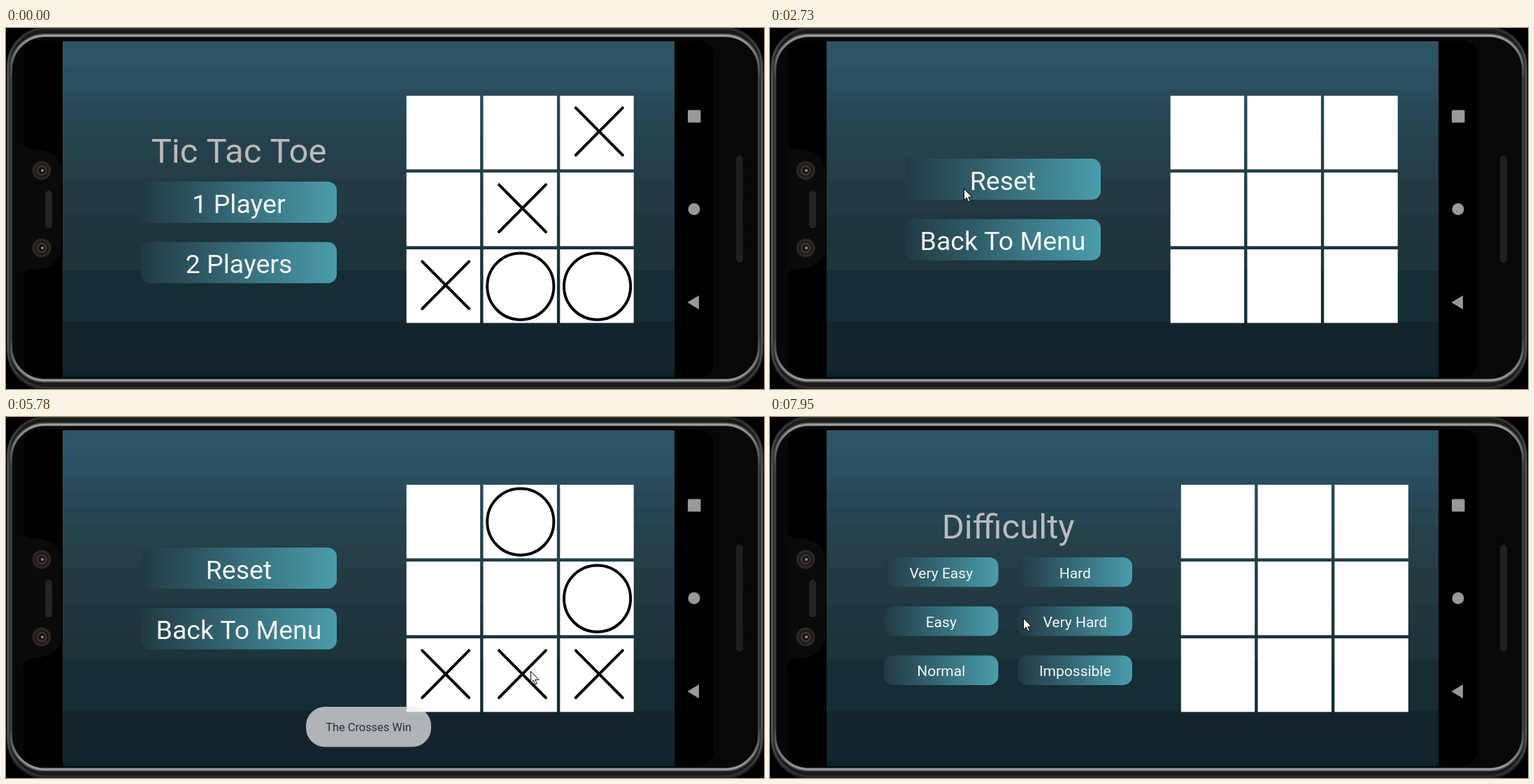
These frames come from a looping animation (1084x517 px, 8000 ms). An HTML page with a canvas:

```html
<!DOCTYPE html>
<html lang="en">
<head>
<meta charset="utf-8">
<title>Tic Tac Toe</title>
<style>
html, body { margin: 0; width: 100%; height: 100%; overflow: hidden; background: #000; }
canvas { display: block; }
</style>
</head>
<body>
<canvas id="stage" width="1084" height="517"></canvas>
<script>
const W = 1084, H = 517, LOOP = 8000, STEP = 70;
const FONT = 'Roboto, "Open Sans", sans-serif';
const stage = document.getElementById('stage').getContext('2d');

const makeLayer = () => {
  const c = document.createElement('canvas');
  c.width = W;
  c.height = H;
  return c;
};

function roundRect(g, x, y, w, h, r) {
  g.beginPath();
  g.roundRect(x, y, w, h, r);
}

function disc(g, x, y, r, color) {
  g.fillStyle = color;
  g.beginPath();
  g.arc(x, y, r, 0, Math.PI * 2);
  g.fill();
}

function label(g, text, x, baseline, size, color) {
  g.font = `${size}px ${FONT}`;
  g.textAlign = 'center';
  g.fillStyle = color;
  g.fillText(text, x, baseline);
}

// ---- phone body ----

function speaker(g, x, y, w, h, color) {
  g.save();
  roundRect(g, x, y, w, h, w / 2);
  g.fillStyle = '#141414';
  g.fill();
  g.clip();
  g.fillStyle = color;
  for (let j = 0; j < h; j += 2)
    for (let i = (j / 2) % 2; i < w; i += 2) g.fillRect(x + i, y + j, 1, 1);
  g.restore();
}

function lens(g, x, y) {
  disc(g, x, y, 13.5, '#2b2721');
  disc(g, x, y, 10, '#1c1915');
  disc(g, x, y, 7.5, '#3a3732');
  disc(g, x, y, 5, '#161616');
  disc(g, x + 1, y, 2, '#8a8a86');
}

// A rounded frame; side and edge are its distances from the stage border.
function ring(g, side, edge, radius, width, color) {
  roundRect(g, side, edge, W - side * 2, H - 1.5 - edge * 2, radius);
  g.lineWidth = width;
  g.strokeStyle = color;
  g.stroke();
}

function metal(g, ends, middle) {
  const fill = g.createLinearGradient(0, 0, 0, H);
  fill.addColorStop(0, ends);
  fill.addColorStop(0.14, middle);
  fill.addColorStop(0.86, middle);
  fill.addColorStop(1, ends);
  return fill;
}

function drawPhone(g) {
  g.fillStyle = '#000';
  g.fillRect(0, 0, W, H);
  roundRect(g, 1, -2, W - 2, H + 4, 56);
  g.fillStyle = '#191a1a';
  g.fill();
  ring(g, 3, 0.5, 55, 3, metal(g, '#2c2d2d', '#555757'));
  ring(g, 7, 10.5, 49, 5, metal(g, '#626464', '#303131'));
  ring(g, 7.5, 11, 48, 2.5, metal(g, '#b4b6b6', '#3c3e3e'));
  roundRect(g, 9, 13.5, W - 18, H - 28.5, 46);
  g.fillStyle = '#080808';
  g.fill();

  roundRect(g, 25, 18, 987, 482, 22);
  g.fillStyle = '#000';
  g.fill();
  g.fillStyle = '#0a0a0a';
  g.beginPath();
  g.moveTo(24, 160);
  g.quadraticCurveTo(25, 174, 40, 174);
  g.quadraticCurveTo(80, 174, 80, 212);
  g.lineTo(80, 307);
  g.quadraticCurveTo(80, 345, 40, 345);
  g.quadraticCurveTo(25, 345, 24, 359);
  g.fill();

  lens(g, 51, 204);
  lens(g, 51, 315);
  speaker(g, 56, 233, 10, 54, '#555');
  speaker(g, 1044, 183, 10, 153, '#444');

  g.fillStyle = '#999';
  roundRect(g, 975, 117.5, 18.5, 18, 1.5);
  g.fill();
  disc(g, 984, 259.5, 8.5, '#999');
  g.beginPath();
  g.moveTo(974.5, 393);
  g.lineTo(991, 383);
  g.lineTo(991, 403);
  g.fill();
}

// ---- app screens ----

const BANDS = [
  [19, '#2d5465'], [55, '#2a5062'], [88, '#294c5c'], [105, '#274857'],
  [130, '#264552'], [155, '#25424c'], [185, '#243f48'], [215, '#233a43'],
  [267, '#1f363e'], [300, '#1d343b'], [347, '#152d34'], [420, '#14242c'],
  [493, '#06232a']
];

function drawBackdrop(g) {
  for (const [y, color] of BANDS) {
    g.fillStyle = color;
    g.fillRect(81, y, 875, 500 - y);
  }
}

function button(g, text, x, y, w, h, size, baseline) {
  const fill = g.createLinearGradient(x, 0, x + w, 0);
  fill.addColorStop(0, '#213a44');
  fill.addColorStop(1, '#4a9dac');
  roundRect(g, x, y, w, h, 13);
  g.fillStyle = fill;
  g.fill();
  label(g, text, x + w / 2, y + baseline, size, '#f6f6f6');
}

const bigButton = (g, text, y) => button(g, text, 193, y, 280, 59, 37.5, 44.7);

function drawMark(g, kind, x, y) {
  g.strokeStyle = '#000';
  g.lineCap = 'round';
  g.lineWidth = 4;
  g.beginPath();
  if (kind === 'X') {
    g.moveTo(x + 22.5, y + 17.3);
    g.lineTo(x + 89.5, y + 85);
    g.moveTo(x + 89.5, y + 17.3);
    g.lineTo(x + 22.5, y + 85);
  } else {
    g.arc(x + 53.3, y + 53.1, 47.6, 0, Math.PI * 2);
  }
  g.stroke();
}

// marks: nine characters, row by row
function drawBoard(g, left, marks) {
  for (let i = 0; i < 9; i++) {
    const x = left + (i % 3) * 109.8, y = 97 + Math.floor(i / 3) * 110;
    g.fillStyle = '#fff';
    g.fillRect(x, y, 105.4, 105.4);
    if (marks[i] !== '.') drawMark(g, marks[i], x, y);
  }
}

const LEVELS = ['Very Easy', 'Hard', 'Easy', 'Very Hard', 'Normal', 'Impossible'];

const SCREENS = {
  menu(g) {
    label(g, 'Tic Tac Toe', 333, 193, 49, '#bbb9bb');
    bigButton(g, '1 Player', 220);
    bigButton(g, '2 Players', 306.5);
  },
  levels(g) {
    label(g, 'Difficulty', 340.5, 174, 49, '#bbbbbb');
    LEVELS.forEach((name, i) =>
      button(g, name, i % 2 ? 354.5 : 163, 201 + Math.floor(i / 2) * 70.3, 163.5, 42.3, 21, 29.8));
  },
  game(g) {
    bigButton(g, 'Reset', 187);
    bigButton(g, 'Back To Menu', 273.7);
  }
};

const EMPTY = '.........', DEMO = '..X.X.XOO';

// [time, screen, marks]
const STATES = [
  [0, 'menu', DEMO],
  [1150, 'levels', DEMO],
  [2660, 'game', EMPTY],
  [3550, 'game', '.O....X..'],
  [4700, 'game', '.O...OX.X'],
  [5500, 'game', '.O...OXXX'],
  [6720, 'menu', EMPTY],
  [7540, 'levels', EMPTY]
];

function drawScreen(g, [, name, marks]) {
  drawBackdrop(g);
  SCREENS[name](g);
  drawBoard(g, name === 'levels' ? 587.8 : 572.7, marks);
}

// ---- toast, pointer ----

const TOAST = [
  [0, 0], [5570, 0.2], [5640, 0.45], [5710, 0.66], [5780, 0.87], [5910, 1],
  [7540, 0.85], [7610, 0.65], [7680, 0.45], [7750, 0.25], [7820, 0.1], [7890, 0]
];

function drawToast(g, alpha) {
  if (!alpha) return;
  g.save();
  g.globalAlpha = alpha;
  roundRect(g, 429, 415, 179, 57.5, 27);
  g.fillStyle = 'rgba(238,238,238,0.82)';
  g.fill();
  label(g, 'The Crosses Win', 518.5, 450, 16.4, '#1c1c1c');
  g.restore();
}

// [start, steps, x, y, bend x, bend y, end x, end y]
const MOVES = [
  [200, 8, 151, 471, 640, 440, 321, 255],
  [1620, 12, 321, 255, 375, 428, 277, 230],
  [2990, 7, 277, 230, 440, 290, 619, 369],
  [3810, 7, 619, 369, 720, 370, 822, 364],
  [5100, 2, 822, 364, 786, 364, 750, 364],
  [6180, 5, 750, 364, 530, 345, 325, 306],
  [7190, 4, 325, 306, 335, 285, 340, 260],
  [7680, 4, 340, 260, 350, 275, 362, 288]
];
const CLICKS = [1080, 2590, 3480, 4630, 5430, 6650, 7470];

const latest = (list, t) => list.findLast(item => item[0] <= t);

function pointerAt(t) {
  const move = latest(MOVES, t);
  if (!move) return null;
  const [start, steps, x0, y0, bx, by, x1, y1] = move;
  const k = Math.floor((t - start) / STEP);
  // the first move starts where the pointer appears
  const raw = move === MOVES[0] ? k / (steps - 1) : (k + 1) / steps;
  const u = Math.min(1, raw), p = u * u * (3 - 2 * u);
  const curve = (a, b, c) => a * (1 - p) ** 2 + 2 * b * p * (1 - p) + c * p * p;
  return [Math.round(curve(x0, bx, x1)), Math.round(curve(y0, by, y1))];
}

const ARROW = new Path2D('M.5 .5V16.5L4.2 13L6.8 18.8L9.2 17.8L6.7 12.2H11.6Z');

function drawPointer(g, t) {
  const at = pointerAt(t);
  if (!at) return;
  if (CLICKS.some(c => t >= c && t < c + STEP))
    disc(g, at[0] - 0.5, at[1], 11, 'rgba(255,255,0,0.62)');
  g.save();
  g.translate(at[0], at[1]);
  g.fillStyle = '#fff';
  g.fill(ARROW);
  g.strokeStyle = '#000';
  g.lineWidth = 1;
  g.stroke(ARROW);
  g.restore();
}

// ---- playback ----

const phone = makeLayer(), incoming = makeLayer();
drawPhone(phone.getContext('2d'));

function drawFrame(t) {
  stage.drawImage(phone, 0, 0);
  const state = latest(STATES, t);
  const before = STATES[STATES.indexOf(state) - 1];
  if (before && before[1] !== state[1] && t < state[0] + STEP) {
    drawScreen(stage, before);
    const g = incoming.getContext('2d');
    g.clearRect(0, 0, W, H);
    drawScreen(g, state);
    stage.globalAlpha = 0.6;
    stage.drawImage(incoming, 0, 0);
    stage.globalAlpha = 1;
  } else {
    drawScreen(stage, state);
  }
  drawToast(stage, latest(TOAST, t)[1]);
  drawPointer(stage, t);
}

const began = performance.now();
function tick() {
  drawFrame((performance.now() - began) % LOOP);
  requestAnimationFrame(tick);
}
tick();
</script>
</body>
</html>
```
